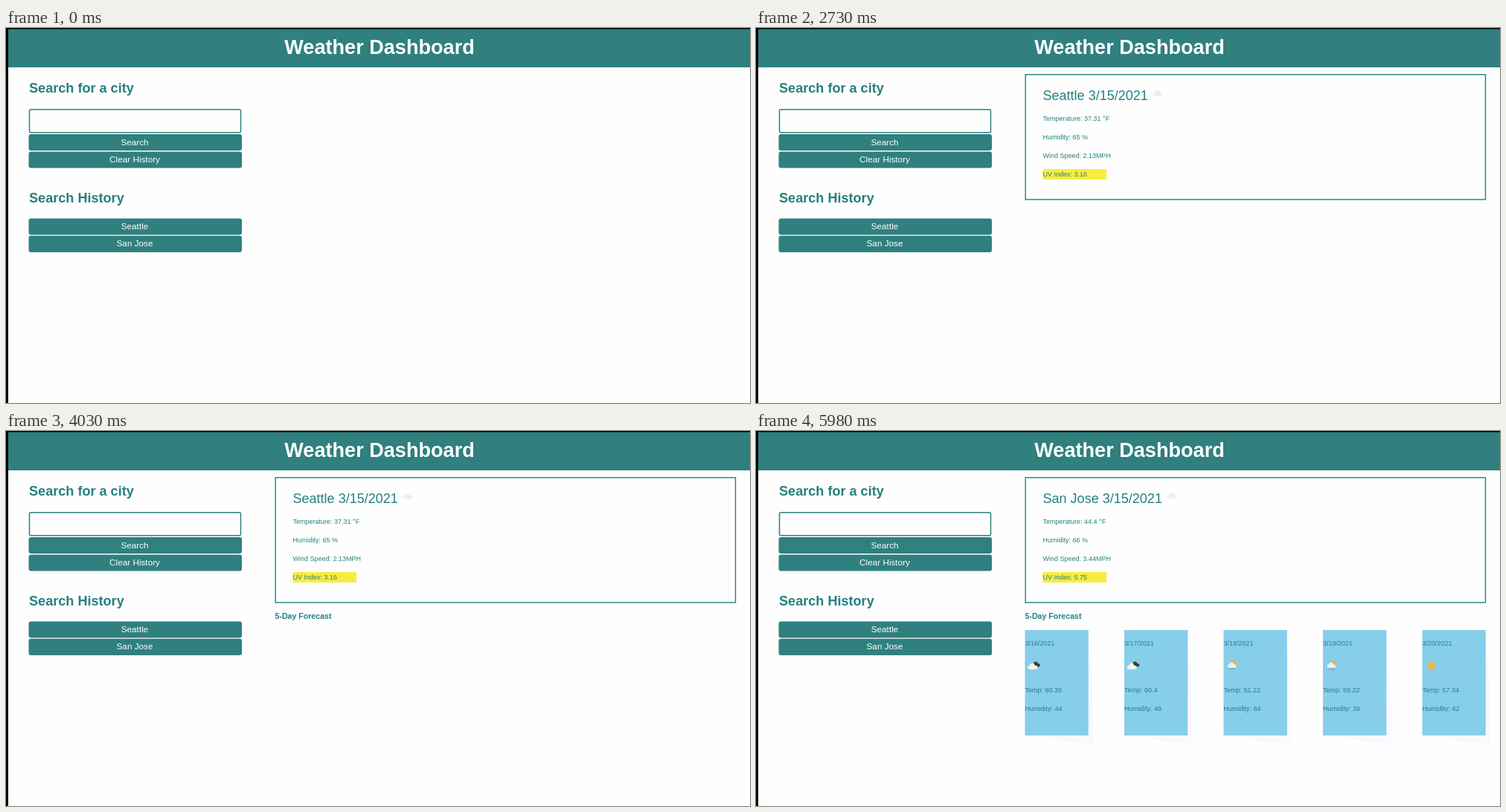
An HTML page with a canvas for the animation above (7.54 s loop, 1000 by 505 pixels).

```html
<!DOCTYPE html>
<html lang="en">
<head>
<meta charset="utf-8">
<title>Weather Dashboard</title>
<style>
html, body { margin: 0; width: 100%; height: 100%; overflow: hidden; background: #fefefe; }
canvas { display: block; width: 1000px; height: 505px; }
</style>
</head>
<body>
<canvas id="stage" width="1000" height="505"></canvas>
<script>
const ctx = document.getElementById('stage').getContext('2d');
const LOOP = 7540;
const TEAL = '#2f807e', INK = '#24807f', WHITE = '#fefefe', SKY = '#87ceeb';
const FONT = '"Liberation Sans", Arial, sans-serif';

const seattle = {
  name: 'Seattle', icon: [540, 88],
  now: ['Temperature: 37.31 °F', 'Humidity: 65 %', 'Wind Speed: 2.13MPH', 'UV Index: 3.16'],
  days: [['few', 50.41, 43], ['broken', 54.93, 47], ['rain', 47.44, 86], ['rain', 51.58, 54], ['rain', 43.47, 85]]
};
const sanJose = {
  name: 'San Jose', icon: [559, 87],
  now: ['Temperature: 44.4 °F', 'Humidity: 66 %', 'Wind Speed: 3.44MPH', 'UV Index: 5.75'],
  days: [['broken', 60.39, 44], ['broken', 60.4, 49], ['rain', 51.22, 84], ['rain', 59.22, 39], ['sun', 57.34, 42]]
};

// from: start in ms; glow: reach of the pale card shadow
const phases = [
  { from: 0 },
  { from: 2340, city: seattle },
  { from: 2990, city: seattle, heading: true, cards: true, sun: '#f2d53c', dark: '#2f4f49' },
  { from: 4030, city: seattle, heading: true },
  { from: 4160, city: sanJose, heading: true, cards: true, sun: '#e8744a', dark: '#4a3d36', glow: [11, 17] },
  { from: 5980, city: sanJose, heading: true, cards: true, sun: '#e9b93a', dark: '#35413f', glow: [7, 11] }
];

function rect(x, y, w, h, color) {
  ctx.fillStyle = color;
  ctx.fillRect(x, y, w, h);
}

function text(str, x, y, size, color = INK, weight = 'normal', align = 'left') {
  ctx.font = `${weight} ${size}px ${FONT}`;
  ctx.textAlign = align;
  ctx.fillStyle = color;
  ctx.fillText(str, x, y);
}

function dot(x, y, r, color) {
  ctx.fillStyle = color;
  ctx.beginPath();
  ctx.arc(x, y, r, 0, Math.PI * 2);
  ctx.fill();
}

function button(label, y, h) {
  ctx.fillStyle = TEAL;
  ctx.beginPath();
  ctx.roundRect(30.5, y, 286.5, h, 3);
  ctx.fill();
  text(label, 173, y + 14.6, 11.75, WHITE, 'normal', 'center');
}

function cloud(x, y, s, color) {
  dot(x - 4.5 * s, y + 1.5 * s, 3 * s, color);
  dot(x - 0.8 * s, y - 0.8 * s, 3.8 * s, color);
  dot(x + 4 * s, y + 1.5 * s, 3 * s, color);
  rect(x - 4.5 * s, y, 8.5 * s, 4.5 * s, color);
}

function sun(x, y, r, color) {
  dot(x, y, r, color);
  ctx.strokeStyle = color;
  ctx.lineWidth = 1;
  ctx.beginPath();
  for (let i = 0; i < 10; i++) {
    const a = i * Math.PI / 5;
    ctx.moveTo(x + Math.cos(a) * r, y + Math.sin(a) * r);
    ctx.lineTo(x + Math.cos(a) * (r + 1.5), y + Math.sin(a) * (r + 1.5));
  }
  ctx.stroke();
}

function weather(kind, x, y, p) {
  if (kind === 'sun') return sun(x, y, 5, p.sun);
  if (kind === 'few') {
    sun(x + 4, y - 1.5, 3.6, p.sun);
    cloud(x - 1, y + 0.5, 0.95, '#f4f4ee');
  } else if (kind === 'broken') {
    cloud(x + 3, y - 2, 0.75, p.dark);
    cloud(x - 1.5, y + 1, 0.9, '#f4f3f0');
  } else {
    sun(x + 3, y - 2.5, 3, p.sun);
    cloud(x - 0.5, y - 0.5, 0.8, '#eef1ee');
    ctx.strokeStyle = '#6d8c98';
    ctx.lineWidth = 1;
    ctx.beginPath();
    for (const dx of [-3, 0, 3]) {
      ctx.moveTo(x + dx, y + 3);
      ctx.lineTo(x + dx - 1, y + 5.5);
    }
    ctx.stroke();
  }
}

function frame() {
  rect(0, 0, 1000, 505, WHITE);
  rect(3, 1, 997, 52, TEAL);
  rect(0, 0, 1000, 1.5, '#000');
  rect(0, 0, 3, 505, '#000');
  text('Weather Dashboard', 502, 35, 27.1, WHITE, 'bold', 'center');

  text('Search for a city', 31, 87, 18.1, INK, 'bold');
  ctx.strokeStyle = TEAL;
  ctx.lineWidth = 1.5;
  ctx.beginPath();
  ctx.roundRect(31.5, 109.7, 284, 31, 2);
  ctx.stroke();
  button('Search', 143, 22);
  button('Clear History', 166.5, 22);
  text('Search History', 31, 234.5, 18.1, INK, 'bold');
  button('Seattle', 256.5, 22);
  button('San Jose', 279.7, 22.3);
}

function current(city) {
  ctx.strokeStyle = INK;
  ctx.lineWidth = 1.4;
  ctx.strokeRect(362.2, 62.7, 618.3, 168.3);
  text(city.name + ' 3/15/2021', 385.5, 97, 18.05);
  cloud(city.icon[0], city.icon[1], 0.85, '#eef0f0');
  rect(385.5, 190, 85.5, 14, '#f9ec3e');
  city.now.forEach((line, i) => text(line, 385.5, 125 + 25 * i, 9));
}

function card(p, i) {
  const x = 361.5 + 133.5 * i;
  const [kind, temp, hum] = p.city.days[i];
  if (p.glow) {
    const [gx, gy] = p.glow;
    ctx.fillStyle = '#fcf7fe';
    ctx.beginPath();
    ctx.moveTo(x + 85, 285);
    ctx.quadraticCurveTo(x + 85 + gx, 330, x + 85 + gx, 410 + gy);
    ctx.quadraticCurveTo(x + 50, 410 + gy, x + 24, 410);
    ctx.lineTo(x + 85, 410);
    ctx.fill();
  }
  rect(x, 268, 85.3, 142, SKY);
  text(`3/${16 + i}/2021`, x, 289, 9);
  weather(kind, x + 12, 316, p);
  text('Temp: ' + temp, x, 352, 9);
  text('Humidity: ' + hum, x, 377, 9);
}

function draw(t) {
  const p = phases.findLast(q => t >= q.from);
  frame();
  if (p.city) current(p.city);
  if (p.heading) text('5-Day Forecast', 361.5, 253, 10.6, INK, 'bold');
  if (p.cards) p.city.days.forEach((_, i) => card(p, i));
}

const start = performance.now();
function tick() {
  draw((performance.now() - start) % LOOP);
  requestAnimationFrame(tick);
}
tick();
</script>
</body>
</html>
```
